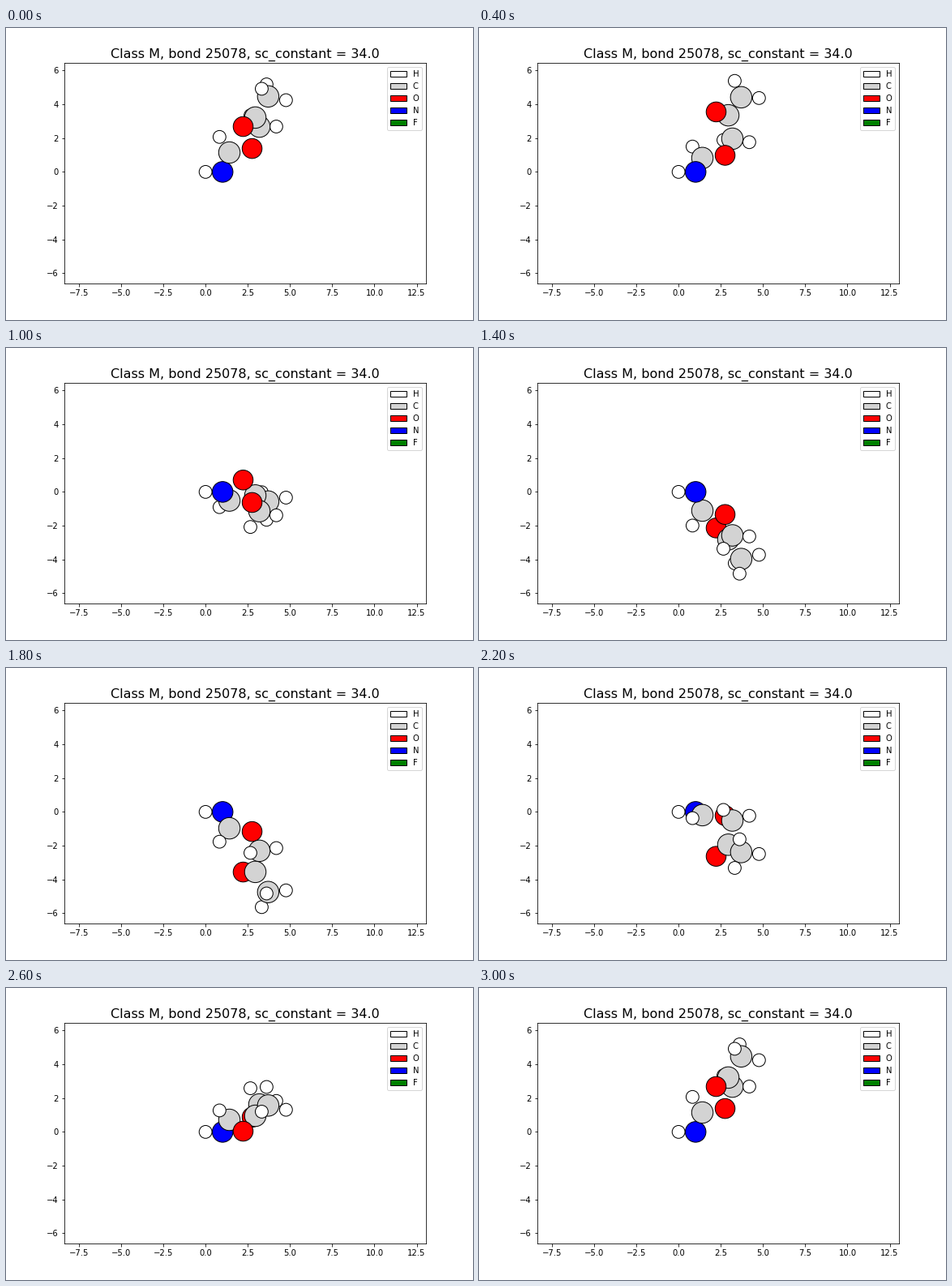
Animation of 576x360 px, one loop 3200 ms. Source, as a matplotlib script:

```python
import numpy as np
import matplotlib.pyplot as plt
from matplotlib.animation import FuncAnimation
from matplotlib.patches import Patch

STEPS = 16
INTERVAL = 200

COLORS = {"H": "white", "C": "lightgray", "O": "red", "N": "blue", "F": "green"}
RADII = {"H": 25, "C": 70, "O": 60, "N": 65, "F": 50}  # picometres

# element, x, y, height towards the viewer
ATOMS = [
    ("H", 0.000, 0.000, 0.000),
    ("N", 1.010, 0.000, 0.000),
    ("C", 1.410, 1.147, 0.072),
    ("H", 0.825, 2.070, 0.154),
    ("O", 2.225, 2.684, 2.362),
    ("O", 2.755, 1.383, 0.075),
    ("C", 3.185, 2.680, 0.230),
    ("C", 2.945, 3.217, 1.613),
    ("C", 3.708, 4.470, 1.920),
    ("H", 2.656, 3.340, -0.470),
    ("H", 4.188, 2.684, -0.050),
    ("H", 3.612, 5.180, 1.085),
    ("H", 3.325, 4.920, 2.818),
    ("H", 4.762, 4.245, 2.060),
]

elements = np.array([a[0] for a in ATOMS])
x, y, z = np.array([a[1:] for a in ATOMS]).T
sizes = np.array([10 * RADII[e] for e in elements])
fills = np.array([COLORS[e] for e in elements])
angles = np.linspace(0, 2 * np.pi, STEPS)

plt.rcParams["font.family"] = "DejaVu Sans"
fig, ax = plt.subplots(figsize=(8, 5), dpi=72)
fig.subplots_adjust(left=0.125, right=0.9, bottom=0.125, top=0.88)
ax.set_xlim(-8.360, 13.070)
ax.set_ylim(-6.606, 6.443)
ax.set_xticks(np.arange(-7.5, 13, 2.5))
ax.set_yticks(np.arange(-6, 7, 2))
ax.set_title("Class M, bond 25078, sc_constant = 34.0", fontsize=16)
ax.legend(
    handles=[Patch(facecolor=c, edgecolor="black", label=e) for e, c in COLORS.items()],
    loc="upper right",
)
atoms = ax.scatter(x, y, s=sizes, c=fills, edgecolors="black", linewidths=1, zorder=2)


def update(i):
    """Turn the molecule about the x axis and paint it back to front."""
    c, s = np.cos(angles[i]), np.sin(angles[i])
    height = y * c + z * s
    depth = z * c - y * s
    order = np.argsort(depth, kind="stable")
    atoms.set_offsets(np.column_stack([x, height])[order])
    atoms.set_sizes(sizes[order], fig.dpi)
    atoms.set_facecolor(list(fills[order]))
    return (atoms,)


anim = FuncAnimation(fig, update, frames=STEPS, interval=INTERVAL, repeat=True)
plt.show()
```
